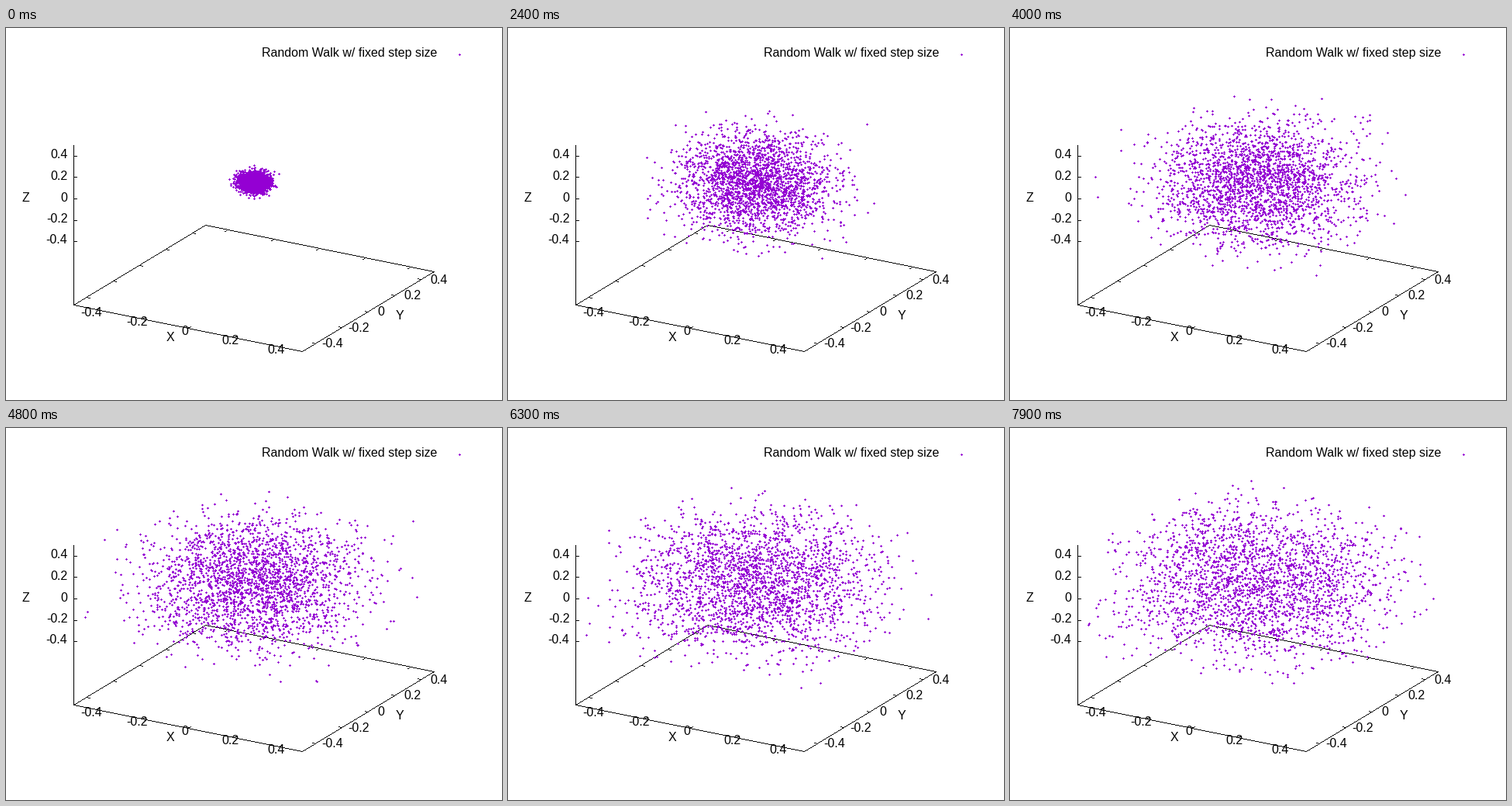
Recreate the animation shown at these times as a matplotlib script. Size 640 by 480 pixels, loop 8 s.

```python
import numpy as np
import matplotlib.pyplot as plt
from matplotlib.animation import FuncAnimation

W, H, DPI = 640, 480, 100
PX = 72 / DPI  # points per pixel
FRAMES, INTERVAL = 80, 100
WALKERS, SUBSTEPS, STEP = 2400, 10, 0.0178
VIOLET, BLACK = (148, 0, 211, 255), (0, 0, 0, 255)
TICKS = (-0.4, -0.2, 0, 0.2, 0.4)

plt.rcParams["font.family"] = "Liberation Sans"
plt.rcParams["font.size"] = 16 * PX


def project(x, y, z):
    """Box coordinates (-0.5..0.5) to stage pixels."""
    return 319.5 + 295 * x + 170 * y, 198.5 + 60 * x - 103 * y - 137.5 * z


def fold(p):
    """Reflect positions off the walls of the box."""
    return 0.5 - np.abs((p + 0.5) % 2 - 1)


def walk():
    """Positions per frame; polar angle is uniform, so z spreads fastest."""
    rng = np.random.default_rng(11)
    shape = (FRAMES, SUBSTEPS, WALKERS)
    theta = np.pi * rng.random(shape)
    phi = 2 * np.pi * rng.random(shape)
    steps = (np.sin(theta) * np.cos(phi),
             np.sin(theta) * np.sin(phi),
             np.cos(theta))
    return [fold(STEP * s.sum(axis=1).cumsum(axis=0)) for s in steps]


def stamp(img, px, py):
    """Paint a 3-pixel plus at every point."""
    cx, cy = np.rint(px).astype(int), np.rint(py).astype(int)
    for dx, dy in ((0, 0), (1, 0), (-1, 0), (0, 1), (0, -1)):
        img[cy + dy, cx + dx] = VIOLET


def line(img, x0, y0, x1, y1):
    """Paint a hard-edged line one pixel wide."""
    n = int(max(abs(x1 - x0), abs(y1 - y0))) + 1
    cx = np.rint(np.linspace(x0, x1, n)).astype(int)
    cy = np.rint(np.linspace(y0, y1, n)).astype(int)
    img[cy, cx] = BLACK


fig = plt.figure(figsize=(W / DPI, H / DPI), dpi=DPI, facecolor="white")
ax = fig.add_axes([0, 0, 1, 1])
ax.axis("off")
base = np.zeros((H, W, 4), np.uint8)


def tick(x, y, dx, dy):
    x, y = round(x), round(y)
    line(base, x, y, x + dx, y + dy)


def label(x, y, s, ha="center"):
    ax.text(x, y, s, ha=ha, va="baseline", color="black")


# Base plane and vertical axis
corners = [(87, 357), (382, 417), (552, 314), (257, 254)]
for a, b in zip(corners, corners[1:] + corners[:1]):
    line(base, *a, *b)
line(base, 87, 151, 87, 357)

for v in TICKS:
    s = f"{v:g}"
    pad = 4.4 if v >= 0 else 0  # room kept for the minus sign

    x, y = 234.5 + 295 * v, 387 + 60 * v
    tick(x, y, 4, -2)
    tick(x + 170, y - 103, -4, 2)
    label(x - 6.5 + pad / 2, y + 9, s)

    x, y = 467 + 170 * v, 365.5 - 103 * v
    tick(x, y, -4, -1)
    tick(x - 295, y - 60, 4, 1)
    label(x + 7.5 + pad, y + 5, s, "left")

    y = 220 - 137.5 * v
    tick(87, y, 4, 0)
    label(79, y + 3, s, "right")

label(211, 404, "X")
label(507, 376, "Y")
label(24.5, 223.5, "Z")
label(555.5, 37, "Random Walk w/ fixed step size", "right")
stamp(base, np.array([585]), np.array([34]))

xs, ys, zs = walk()
layer = ax.imshow(base, interpolation="nearest", aspect="auto", zorder=5,
                  extent=(-0.5, W - 0.5, H - 0.5, -0.5))
ax.set_xlim(-0.5, W - 0.5)
ax.set_ylim(H - 0.5, -0.5)


def draw(i):
    img = base.copy()
    stamp(img, *project(xs[i], ys[i], zs[i]))
    layer.set_data(img)
    return [layer]


anim = FuncAnimation(fig, draw, frames=FRAMES, interval=INTERVAL,
                     repeat=True, repeat_delay=0)
plt.show()
```
